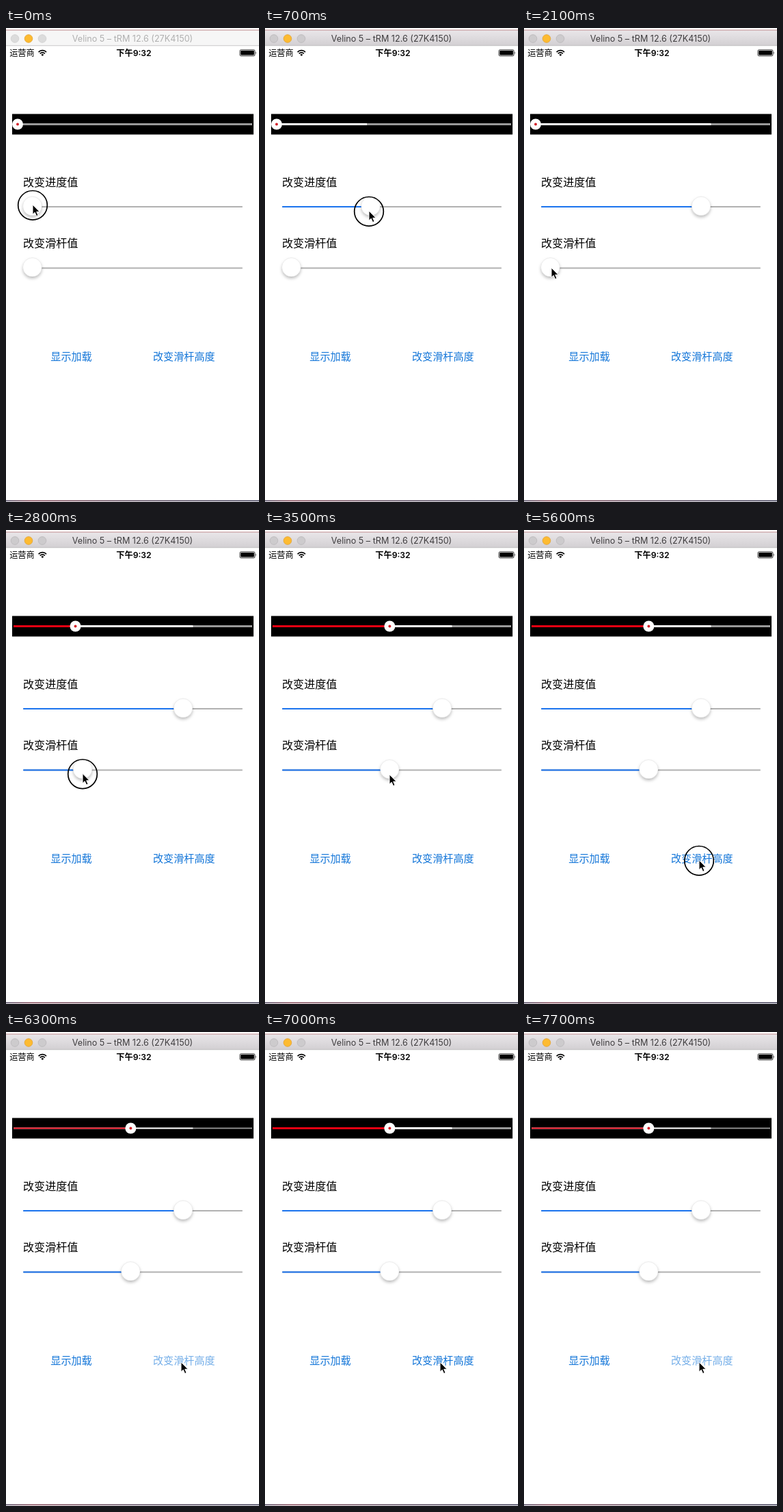
These frames come from a looping animation (370x692 px, 8 s). An HTML page:

```html
<!DOCTYPE html>
<html lang="zh-CN">
<head>
<meta charset="utf-8">
<title>Slider demo</title>
<style>
html, body { margin: 0; width: 100%; height: 100%; overflow: hidden; background: #fff; }
svg { display: block; width: 370px; height: 692px; }
text { font-family: "Noto Sans CJK SC", "Noto Sans CJK", sans-serif; fill: #000; }
.title { font: 12.6px Inter, sans-serif; text-anchor: middle; fill: #3f3d3f; }
.status { font-size: 12.2px; }
.clock { font: 600 12.2px Inter, "Noto Sans CJK SC", "Noto Sans CJK", sans-serif; text-anchor: middle; }
.label { font-size: 16.1px; }
.button { font-size: 15.1px; fill: #1275d8; }
.knob { fill: #fff; stroke: #000; stroke-opacity: .12; stroke-width: .6; filter: url(#shadow); }
.rail { fill: #b1b1b1; }
.fill { fill: #1a73ee; }
.idle .title { fill: #b0b0b0; }
.idle .light { fill: #dcdcdc; stroke: #cecece; }
.light { fill: #cdcbcd; stroke: #b9b7b9; stroke-width: .8; }
.light.min { fill: #fdbb31; stroke: #e2a02c; }
</style>
</head>
<body>
<svg id="stage" viewBox="0 0 370 692">
  <defs>
    <linearGradient id="bar" x2="0" y2="1">
      <stop stop-color="#e9e6e9"/><stop offset="1" stop-color="#d2cfd2"/>
    </linearGradient>
    <linearGradient id="edge">
      <stop stop-color="#413a55"/><stop offset=".1" stop-color="#7d3c4c"/><stop offset=".5" stop-color="#4d3a50"/><stop offset="1" stop-color="#2e2c48"/>
    </linearGradient>
    <filter id="shadow" x="-40%" y="-40%" width="180%" height="200%">
      <feDropShadow dx="0" dy="2.6" stdDeviation="2" flood-opacity=".26"/>
    </filter>
  </defs>
  <rect width="370" height="692" fill="#fff"/>

  <rect y="2.6" width="370" height="1.2" fill="#b5787c"/>
  <rect id="titleBar" y="3.6" width="370" height="22.4" fill="url(#bar)"/>
  <rect y="25.4" width="370" height=".8" fill="#bfbdbf"/>
  <circle class="light" cx="13" cy="15.5" r="5.8"/>
  <circle class="light min" cx="33" cy="15.5" r="5.8"/>
  <circle class="light" cx="53" cy="15.5" r="5.8"/>
  <text class="title" x="185" y="20.2">Velino 5 – tRM 12.6 (27K4150)</text>
  <rect y="689.6" width="370" height="1.4" fill="url(#edge)"/>

  <text class="status" x="5.2" y="41">运营商</text>
  <g fill="none" stroke="#000" stroke-width="1.7">
    <path d="M47.6 35.1a8 8 0 0 1 11.4 0M49.7 37.4a5.1 5.1 0 0 1 7.2 0"/>
    <path d="M53.3 41l-2-2.1a2.9 2.9 0 0 1 4 0z" fill="#000" stroke="none"/>
  </g>
  <text class="clock" x="187" y="40.7">下午9:32</text>
  <rect x="342" y="31.8" width="22" height="9" rx="1.8" fill="none" stroke="#000" stroke-width=".8"/>
  <rect x="343.2" y="33" width="19.6" height="6.6" rx=".8"/>
  <path d="M365 34.6q1.5 1.7 0 3.4z"/>

  <rect x="9" y="125.5" width="353" height="30"/>
  <g id="track">
    <rect x="11" width="349" fill="#999"/>
    <rect id="buffer" x="11" fill="#fff"/>
    <rect id="played" x="11" fill="#e60012"/>
  </g>
  <g id="head">
    <circle r="8" fill="#fff"/>
    <g id="spinner" stroke="#555" stroke-width=".9" stroke-linecap="round"></g>
    <circle r="2" fill="#d3222a"/>
  </g>

  <text class="label" x="25" y="231">改变进度值</text>
  <rect class="rail" x="25" y="260" width="321" height="2" rx="1"/>
  <rect class="fill" id="fillA" x="25" y="260" height="2" rx="1"/>
  <circle class="knob" id="knobA" cy="260" r="13.8"/>

  <text class="label" x="25" y="320.3">改变滑杆值</text>
  <rect class="rail" x="25" y="349.5" width="321" height="2" rx="1"/>
  <rect class="fill" id="fillB" x="25" y="349.5" height="2" rx="1"/>
  <circle class="knob" id="knobB" cy="349.3" r="13.8"/>

  <text class="button" id="loadButton" x="65.3" y="484.8"></text>
  <text class="button" id="heightButton" x="215" y="484.8">改变滑杆高度</text>

  <g id="cursor">
    <circle id="ring" cy=".8" r="21.3" fill="none" stroke="#000" stroke-width="1.7"/>
    <path d="M0 0V14.2L3.2 11.2L5.6 16.6L8 15.5L5.7 10.3H10.1Z" stroke="#fff" stroke-width="1" stroke-linejoin="round"/>
  </g>
</svg>
<script>
const LOOP = 8000, STEP = 700, START = 38.5;
const $ = id => document.getElementById(id);
const set = (id, attrs) => {
  for (const k in attrs) $(id).setAttribute(k, attrs[k]);
};

// Each step lists only what changes from the step before.
const changes = [
  { a: START, b: START, at: [39, 258], press: true, idle: true, loading: false, thick: true, dim: false },
  { a: 154.5, at: [152, 267], idle: false },
  { a: 259, at: [257, 267] },
  { at: [40, 350], press: false },
  { b: 112, at: [112, 355.5], press: true },
  { b: 182.3, at: [182, 357], press: false },
  { at: [110, 475] },
  { loading: true },
  { at: [256, 482], press: true, loading: false },
  { press: false, thick: false, dim: true },
  { thick: true, dim: false },
  { thick: false, dim: true }
];
const states = [];
changes.forEach((c, i) => states.push({ ...states[i - 1], ...c }));

for (let i = 0; i < 12; i++) {
  const ray = document.createElementNS("http://www.w3.org/2000/svg", "path");
  ray.setAttribute("d", "M0 -3.2V-5.6");
  ray.setAttribute("transform", `rotate(${i * 30})`);
  ray.setAttribute("opacity", 0.3 + 0.05 * i);
  $("spinner").append(ray);
}

function draw(s) {
  const head = 17 + (s.b - START) * 1.15;
  const thickness = s.thick ? 3 : 1.8;
  for (const r of $("track").children) {
    r.setAttribute("y", 140.5 - thickness / 2);
    r.setAttribute("height", thickness);
  }
  set("buffer", { width: (s.a - START) * 1.19 });
  set("played", { width: head - 11, visibility: s.b > START ? "visible" : "hidden" });
  set("head", { transform: `translate(${head} 140.5)` });
  set("spinner", { visibility: s.loading ? "visible" : "hidden" });
  set("knobA", { cx: s.a });
  set("knobB", { cx: s.b });
  set("fillA", { width: s.a - 25 });
  set("fillB", { width: s.b - 25 });
  set("stage", { class: s.idle ? "idle" : "" });
  set("titleBar", { fill: s.idle ? "#f6f6f6" : "url(#bar)" });
  set("heightButton", { opacity: s.dim ? 0.58 : 1 });
  $("loadButton").textContent = s.loading ? "隐藏加载" : "显示加载";
  set("cursor", { transform: `translate(${s.at})` });
  set("ring", { visibility: s.press ? "visible" : "hidden" });
}

const begin = performance.now();
let shown = -1;
function tick() {
  const step = Math.floor(((performance.now() - begin) % LOOP) / STEP);
  if (step !== shown) draw(states[shown = step]);
  requestAnimationFrame(tick);
}
tick();
</script>
</body>
</html>
```
